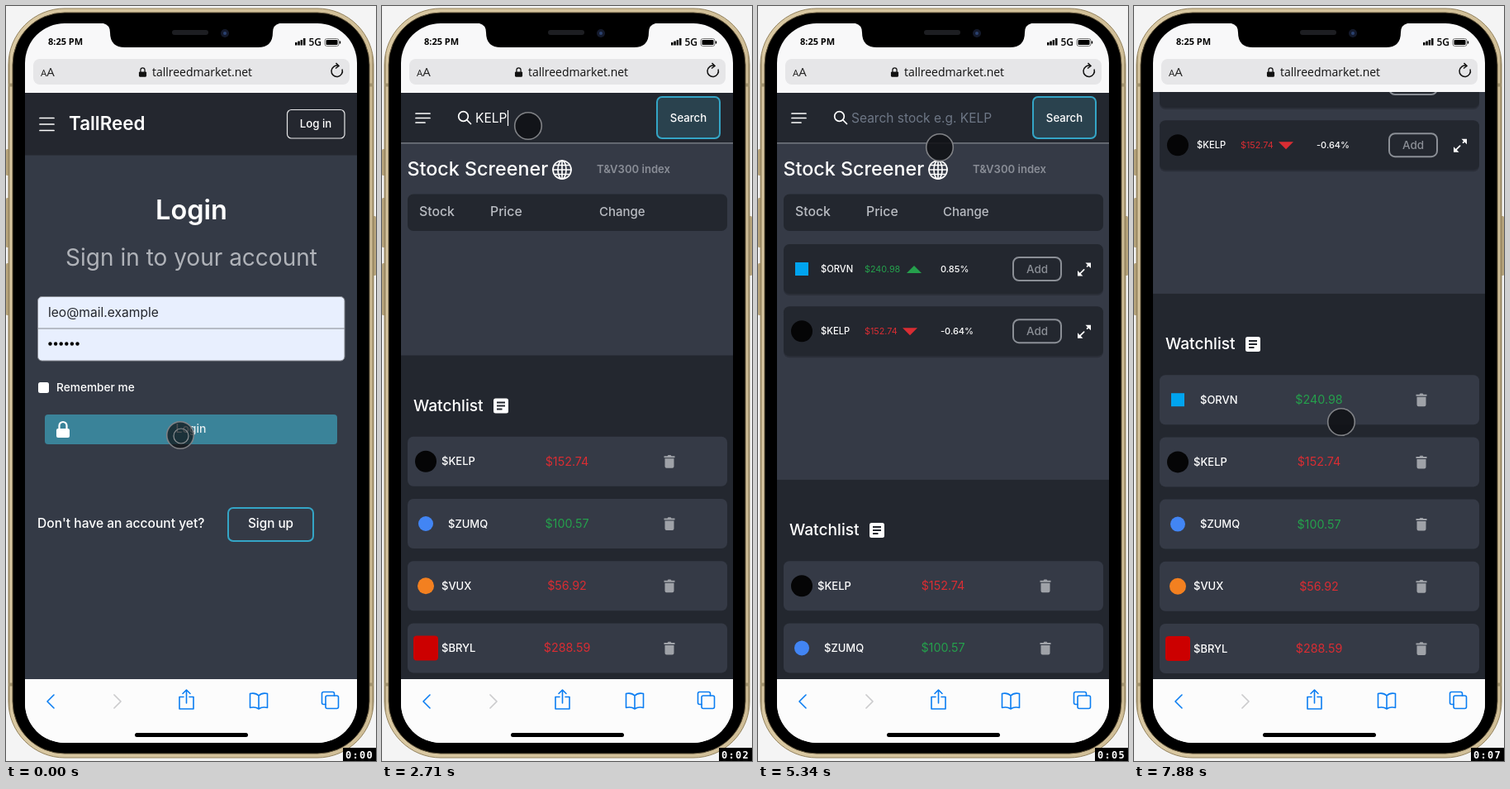
Recreate the animation shown at these times as an HTML page. Size 448x913 px, loop 8000 ms.

```html
<!DOCTYPE html>
<html lang="en">
<head>
<meta charset="utf-8">
<title>Stock screener demo</title>
<style>
html, body { margin: 0; width: 100%; height: 100%; overflow: hidden; background: #f4f4f4; }
svg { display: block; width: 100%; height: 100%; font-family: Inter, "Open Sans", sans-serif; }
.sys { font-family: "Open Sans", "Noto Sans", sans-serif; }
.line { fill: none; stroke: #fff; stroke-width: 1.7; stroke-linecap: round; stroke-linejoin: round; }
.blue { stroke: #0a7df2; stroke-width: 1.6; }
#clock { font: bold 12px "DejaVu Sans Mono", monospace; letter-spacing: 1.3px; fill: #fff; }
</style>
</head>
<body>
<svg viewBox="0 0 448 913">
  <defs>
    <linearGradient id="gold">
      <stop offset="0" stop-color="#8d7c59"/><stop offset=".006" stop-color="#d9c8a2"/>
      <stop offset=".994" stop-color="#d0be97"/><stop offset="1" stop-color="#8d7c59"/>
    </linearGradient>
    <clipPath id="glass"><rect x="23" y="21" width="402" height="870" rx="48"/></clipPath>
    <clipPath id="view"><rect x="23" y="104" width="402" height="710"/></clipPath>
    <clipPath id="card"><rect x="31" y="288" width="372.5" height="700"/></clipPath>
    <symbol id="trash" overflow="visible">
      <path fill="#9fa2a8" d="M-6.5-6.500h4l1-1.200h3l1 1.200h4v2h-13zM-5.500-3.500h11v9.500q0 2-2 2h-7q-2 0-2-2z"/>
    </symbol>
    <symbol id="expand" overflow="visible">
      <path class="line" stroke-dasharray="8 5.5" d="M-6 6L6-6"/>
      <path fill="#fff" d="M8-8v6.500L1.500-8zM-8 8v-6.500L-1.500 8z"/>
    </symbol>
    <symbol id="lock" overflow="visible">
      <path fill="none" stroke="currentColor" stroke-width="2.2" d="M-4.500 0v-4.500a4.500 4.500 0 0 1 9 0V0"/>
      <rect x="-8" y="-1" width="16" height="11" rx="2" fill="currentColor"/>
    </symbol>
  </defs>

  <!-- phone body -->
  <g fill="#b9a67d">
    <rect y="173" width="5" height="32" rx="1.5"/><rect y="232" width="5" height="60" rx="1.5"/>
    <rect y="311" width="5" height="63" rx="1.5"/><rect x="443" y="254" width="5" height="72" rx="1.5"/>
  </g>
  <rect x="3" y="3" width="442" height="906" rx="68" fill="url(#gold)" stroke="#94835e"/>
  <path d="M3 95.500h6M439 95.500h6M3 820.500h6M439 820.500h6" stroke="#a3946f" stroke-width="4"/>
  <rect x="8" y="8" width="432" height="896" rx="63" stroke="#5b4f37"/>

  <g clip-path="url(#glass)">
    <rect x="23" y="21" width="402" height="870" fill="#f8f8f9"/>
    <g clip-path="url(#view)"><g id="login"></g><g id="stocks"></g></g>

    <!-- status and address bars -->
    <path d="M113 20.500q13 0 13 11.500q0 18 18 18h161q18 0 18-18q0-11.500 13-11.500z"/>
    <rect x="201" y="29" width="44" height="6" rx="3" fill="#1d1e22"/>
    <circle cx="265" cy="33" r="5" fill="#141a2c"/><circle cx="265" cy="33" r="2" fill="#2a4170"/>
    <g class="sys">
      <text x="51" y="47" font-size="11" font-weight="700">8:25 PM</text>
      <text x="366.5" y="48" font-size="12" font-weight="600">5G</text>
      <rect x="33" y="64" width="383" height="31" rx="8" fill="#e6e6e8"/>
      <text x="42" y="85" font-size="11.5" fill="#222">A<tspan font-size="15">A</tspan></text>
      <text x="177" y="85" font-size="14" fill="#111">tallreedmarket.net</text>
    </g>
    <path d="M350 44h2.500v3.500h-2.500zM353.300 42.500h2.500v5h-2.500zM356.600 41h2.500v6.500h-2.500zM360 39h2.500v8.500h-2.500z"/>
    <rect x="386" y="39.5" width="17" height="9" rx="2.5" fill="none" stroke="#777"/>
    <rect x="387.5" y="41" width="14" height="6" rx="1"/><rect x="403.7" y="42.5" width="1.5" height="3"/>
    <use href="#lock" transform="translate(165.5 80) scale(.57)" color="#111"/>
    <path d="M407 76.500a6.700 6.700 0 1 1-4.500-4.200M399.500 69l3.500 3.500-4 3" fill="none" stroke="#111" stroke-width="1.5"/>

    <!-- toolbar -->
    <rect x="23" y="814" width="402" height="77" fill="#fcfcfc"/>
    <path class="line blue" d="M58 833l-8 8 8 8"/>
    <path class="line" style="stroke:#cbcbcd" d="M131 833l8 8-8 8"/>
    <path class="line blue" d="M215 835.500h-5v14.500h17v-14.500h-5M218.500 843v-15.500M214 831.500l4.500-4.500 4.500 4.500"/>
    <path class="line blue" d="M306 834q-4-4-10.500-2.500v17q6.500-1.500 10.500 1.500q4-3 10.500-1.500v-17q-6.500-1.500-10.500 2.500v16"/>
    <path class="line blue" d="M387 844.500h-2.500q-2 0-2-2v-11q0-2 2-2h11q2 0 2 2v2.500"/>
    <rect class="line blue" x="387" y="834" width="15.5" height="15.5" rx="2"/>
    <rect x="156" y="879" width="137" height="5" rx="2.5"/>
  </g>

  <g id="cursor">
    <circle id="dot" r="16.3" fill="#101216" stroke="#808286" stroke-width="1.6"/>
    <circle id="ring" cx="1" cy="1" r="9" fill="none" stroke="#8e9194" stroke-width="1.2"/>
  </g>
  <rect x="408" y="897" width="40" height="16"/><text id="clock" x="411" y="909.5"></text>
</svg>

<script>
const $ = id => document.getElementById(id);
const show = (id, on) => { $(id).style.display = on ? '' : 'none'; };
const move = (id, x, y) => $(id).setAttribute('transform', `translate(${x} ${y})`);

const GREY = '#a6a9b0', DARK = '#23272f', SLATE = '#353a46', TEAL = '#34a5c6';
const RED = '#d92d33', GREEN = '#25a04c', PITCH = 75.2;

const text = (x, y, size, str, fill = '#fff', weight = 500, more = '') =>
  `<text x="${x}" y="${y}" font-size="${size}" fill="${fill}" font-weight="${weight}" ${more}>${str}</text>`;
const rect = (x, y, w, h, r, fill, more = '') =>
  `<rect x="${x}" y="${y}" width="${w}" height="${h}" rx="${r}" fill="${fill}" ${more}/>`;
const border = (color, width) => `stroke="${color}" stroke-width="${width}"`;
const mid = 'text-anchor="middle"';
const path = d => `<path class="line" d="${d}"/>`;

// half and color describe the plain mark, tx is the ticker offset on the watchlist
const stocks = [
  { id: 'ORVN', price: '$240.98', change: '0.85%', up: true, tx: 80, half: 8, color: '#00a4ef', square: true },
  { id: 'KELP', price: '$152.74', change: '-0.64%', tx: 72, half: 13, color: '#050506' },
  { id: 'ZUMQ', price: '$100.57', up: true, tx: 80, half: 9, color: '#4285f4' },
  { id: 'VUX', price: '$56.92', tx: 72, half: 10, color: '#f38020' },
  { id: 'BRYL', price: '$288.59', tx: 72, half: 15, color: '#cc0000', square: true }
];
const mark = s => s.square
  ? rect(53 - s.half, 30 - s.half, 2 * s.half, 2 * s.half, s.half > 10 ? 4 : 0, s.color)
  : `<circle cx="53" cy="30" r="${s.half}" fill="${s.color}"/>`;
const tone = s => s.up ? GREEN : RED;

const watchCard = s => `<g id="w${s.id}">${rect(31, 0, 387, 60, 7, SLATE)}${mark(s)}
  ${text(s.tx, 34.5, 13, '$' + s.id)}${text(224, 35, 14.3, s.price, tone(s), 400, mid)}
  <use href="#trash" x="348" y="30"/></g>`;

const resultRow = s => `<g id="r${s.id}">
  ${rect(31, 2, 387, 60, 7, 'rgba(20,22,28,.3)')}${rect(31, 0, 387, 60, 7, DARK, `id="b${s.id}"`)}${mark(s)}
  ${text(76, 34, 11.2, '$' + s.id)}${text(129, 34, 10.8, s.price, tone(s), 400)}
  <path fill="${tone(s)}" d="${s.up ? 'M180 35h18l-9-9z' : 'M175 26h18l-9 9z'}"/>
  ${text(221, 34, 11, s.change)}
  ${rect(309, 16, 58, 28, 7, 'none', border('#8b8f96', 2))}${text(338, 35, 13.5, 'Add', '#8b8f96', 500, mid)}
  <use href="#expand" x="395" y="30.5"/></g>`;

$('login').innerHTML =
  rect(23, 105, 402, 709, 0, '#343a46') + rect(23, 105, 402, 75.5, 0, '#24272f') +
  path('M41 135.500h17M41 143h17M41 150.500h17') + text(76, 150, 22.4, 'TallReed', '#fff', 600) +
  rect(340.5, 125.5, 69.5, 34.5, 5, 'none', border('#e8e8ea', 1.2)) + text(375, 147, 13.3, 'Log in', '#fff', 500, mid) +
  text(224.5, 258, 32.5, 'Login', '#fff', 600, mid) +
  text(224.5, 314, 28, 'Sign in to your account', '#b0b3b9', 400, mid) +
  rect(38.5, 351.5, 371.5, 77.5, 5, '#e8effe', border('#85888f', 1)) + rect(39, 389.5, 371, 1, 0, '#85888f') +
  text(51, 376, 15.6, 'leo@mail.example', '#23262c', 400) +
  [0, 1, 2, 3, 4, 5].map(i => `<circle cx="${53.5 + i * 6.6}" cy="408.5" r="2.2"/>`).join('') +
  rect(39, 455, 13, 13, 2.5, '#fff') + text(61, 466, 13.7, 'Remember me') +
  rect(45.5, 492.5, 357, 39, 5, 'none', 'id="glow" ' + border('rgba(58,131,152,.5)', 3)) +
  rect(47, 494, 354, 36, 4, '#3a8399') + '<use href="#lock" x="69" y="512" color="#fff"/>' +
  text(224, 516, 14, 'Login', '#e6eef0', 500, mid) +
  text(38, 631, 15.6, "Don't have an account yet?") +
  rect(269, 607, 103, 40, 6, 'none', border(TEAL, 2)) + text(320.5, 631, 15.3, 'Sign up', '#fff', 500, mid);

const facts = [
  ['CEO', 'Mr. Dilan Marwick', 'Employees', '221000'],
  ['Founded', '1902', 'Headquarters', 'Saint Paul, Minnesota'],
  ['Industry', 'Information Technology', 'Sector', 'Systems Software']
];
const stats = [
  ['Open', '$237.87', 'Volume', '31,061,162'], ['High', '$243.86', 'Avg volume', '24,509,800'],
  ['Low', '$237.57', 'P/E ratio', '24.97'], ['52 Wk high', '$349.67', 'Mkt cap', '$1,797,202,240,000'],
  ['52 Wk low', '$237.57', 'Date added', '1994-06-01']
];
const about = ['Orvandale Corporation develops, licenses, and supports',
  'software, services, devices, and solutions worldwide.',
  'The company operates in three segments: Productivity', 'and Busi...'];

const detail = text(46, 366, 16.8, 'Orvandale Corporation', TEAL, 400) +
  facts.map(([a, b, c, d], i) => {
    const y = 395 + i * 53;
    return text(46, y, 13.2, a, GREY) + text(46, y + 19, 13.2, b) +
      text(225, y, 13.2, c, GREY) + text(225, y + 19, 13.2, d);
  }).join('') +
  text(46, 559, 18.8, 'Stats') +
  stats.map(([a, b, c, d], i) => {
    const y = 587 + i * 19.7;
    return text(46, y, 13.2, a, GREY) + text(132, y, 12.8, b) +
      text(225, y, i == 4 ? 11.2 : 13.2, c, GREY) + text(313, y - (i == 2 ? 1.5 : 0), i == 3 ? 14.6 : 12.7, d);
  }).join('') +
  text(46, 721, 18.7, 'About Orvandale Corporation') + rect(46, 727, 261, 2, 0, TEAL) +
  about.map((s, i) => text(46, 758 + i * 19, 13.3, s)).join('');

$('stocks').innerHTML =
  rect(23, 105, 402, 1400, 0, SLATE) + rect(23, 105, 402, 61, 0, DARK) + rect(23, 165, 402, 1.6, 0, '#70747c') +
  path('M41 130h17M41 135.500h17M41 141h11') + '<circle class="line" cx="98.5" cy="133.5" r="5.8"/>' + path('M103 138l4.500 4.500') +
  text(113, 141, 15.5, '', '#6e7786', 400, 'id="query"') + rect(113, 126, 1.2, 19, 0, '#fff', 'id="caret"') +
  rect(333, 110, 76, 50, 6, '#2a424e', border(TEAL, 2)) + text(371, 140, 13.2, 'Search', '#fff', 500, mid) +
  text(30.5, 205, 23.3, 'Stock Screener', '#fff', 450) +
  '<g class="line"><circle cx="218" cy="198" r="11"/><ellipse cx="218" cy="198" rx="5" ry="11"/></g>' +
  path('M218 187v22M207 198h22M209 192.500h18M209 203.500h18') +
  text(260, 202, 13.1, 'T&amp;V300 index', '#8a8e97', 600) +
  rect(31, 227.5, 387, 44.5, 7, DARK) + text(45, 254, 15.8, 'Stock', '#b9bcc2') + text(131, 254, 15.8, 'Price', '#b9bcc2') +
  text(263, 254, 15, 'Change', '#b9bcc2', 500, 'id="change"') +
  stocks.slice(0, 2).map(resultRow).join('') + `<g id="detail" clip-path="url(#card)">${detail}</g>` +
  `<g id="watch">${rect(23, 0, 402, 1000, 0, DARK)}${text(38, 67, 19.2, 'Watchlist')}${rect(135, 52, 18, 18, 2.5, '#fff')}
    <path d="M139 57h10M139 61h10M139 65h6.500" stroke="${DARK}" stroke-width="2"/>${stocks.map(watchCard).join('')}</g>` +
  `<g id="popup"><path fill="#2b2c2e" d="M177 173h11l8.500-8.500 8.500 8.500h40q2 0 2 2v40q0 2-2 2h-67q-2 0-2-2v-40q0-2 2-2z"/>
    <text id="hint" class="sys" x="187" y="200" font-size="12.3" fill="#fff"></text></g>`;

// moments at which the picture is refreshed
const ticks = [0, 120, 240, 360, 510, 760, 880, 1000, 1130, 1250, 1370, 1490, 1610, 1860, 1960, 2220, 2470, 2590, 2710,
  2860, 2960, 3220, 3490, 3610, 3730, 3850, 3970, 4090, 4370, 4490, 4610, 4730, 4870, 4970, 5340, 5460, 5580, 5700,
  5800, 5920, 6040, 6160, 6280, 6400, 6780, 6920, 7020, 7140, 7260, 7400, 7520, 7640, 7760, 7880];

// pointer path: time, x, y
const route = [[0, 211, 519], [120, 211, 519], [360, 198, 451], [510, 172, 320], [760, 146, 290], [1130, 141, 286],
  [1490, 172, 160], [1610, 177, 145], [4090, 177, 145], [4610, 247, 161], [4730, 220, 171], [5340, 220, 171],
  [6040, 402, 322], [6920, 402, 322], [7140, 340, 318], [7260, 340, 318], [7880, 251, 503]];
const typing = [[0, ''], [1960, 'K'], [2220, 'KE'], [2470, 'KEL'], [2590, 'KELP'], [2860, ''],
  [3490, 'O'], [3730, 'OR'], [3850, 'ORV'], [4090, 'ORVN'], [4730, '']];

const last = (list, t) => list.filter(k => k[0] <= t).pop();
const within = (t, ...spans) => spans.some(([a, b]) => t >= a && t < b);

function pointer(t) {
  const a = last(route, t), b = route[route.indexOf(a) + 1] || a;
  const p = a === b ? 0 : (t - a[0]) / (b[0] - a[0]);
  return [a[1] + (b[1] - a[1]) * p, a[2] + (b[2] - a[2]) * p];
}

function render(now) {
  const loop = now % 8000, t = ticks.filter(k => k <= loop).pop();
  const rows = t < 2960 ? 0 : t < 4730 ? 1 : 2;
  const open = within(t, [6160, 6920]), added = t >= 7260;

  show('login', t < 760);
  show('stocks', t >= 760);
  show('glow', t >= 120);

  const typed = last(typing, t)[1], query = $('query');
  query.textContent = typed || 'Search stock e.g. KELP';
  query.setAttribute('fill', typed ? '#fff' : '#6e7786');
  show('caret', within(t, [1860, 3220], [3490, 5340]));
  $('caret').setAttribute('x', 113 + (typed ? query.getComputedTextLength() + .5 : 0));
  show('popup', within(t, [1960, 2710], [3490, 4730]));
  $('hint').textContent = t < 3000 ? 'KELP' : 'ORVN';

  $('change').setAttribute('x', rows ? 224 : 263);
  show('rORVN', rows > 1);
  show('rKELP', rows && !open);
  move('rORVN', 0, 288);
  move('rKELP', 0, 288 + (rows > 1 ? PITCH : 0));
  $('bORVN').setAttribute('height', open ? 620 : 60);
  show('detail', open);

  move('watch', 0, open ? 1000 : 422.5 + rows * PITCH);
  show('wORVN', added);
  stocks.forEach((s, i) => move('w' + s.id, 0, 98.3 + (i - !added) * PITCH));

  const p = Math.min(1, Math.max(0, (t - 7260) / 620));
  move('stocks', 0, -225 * p * p * (3 - 2 * p));

  const press = within(t, [0, 120], [1860, 1960], [6160, 6280], [6780, 6920], [7260, 7400]);
  move('cursor', ...pointer(t));
  show('ring', press);
  $('dot').setAttribute('fill-opacity', press ? .72 : .88);
  $('clock').textContent = '0:0' + Math.floor((t + 40) / 1000);
}

function frame() {
  render(performance.now());
  requestAnimationFrame(frame);
}
frame();
</script>
</body>
</html>
```
